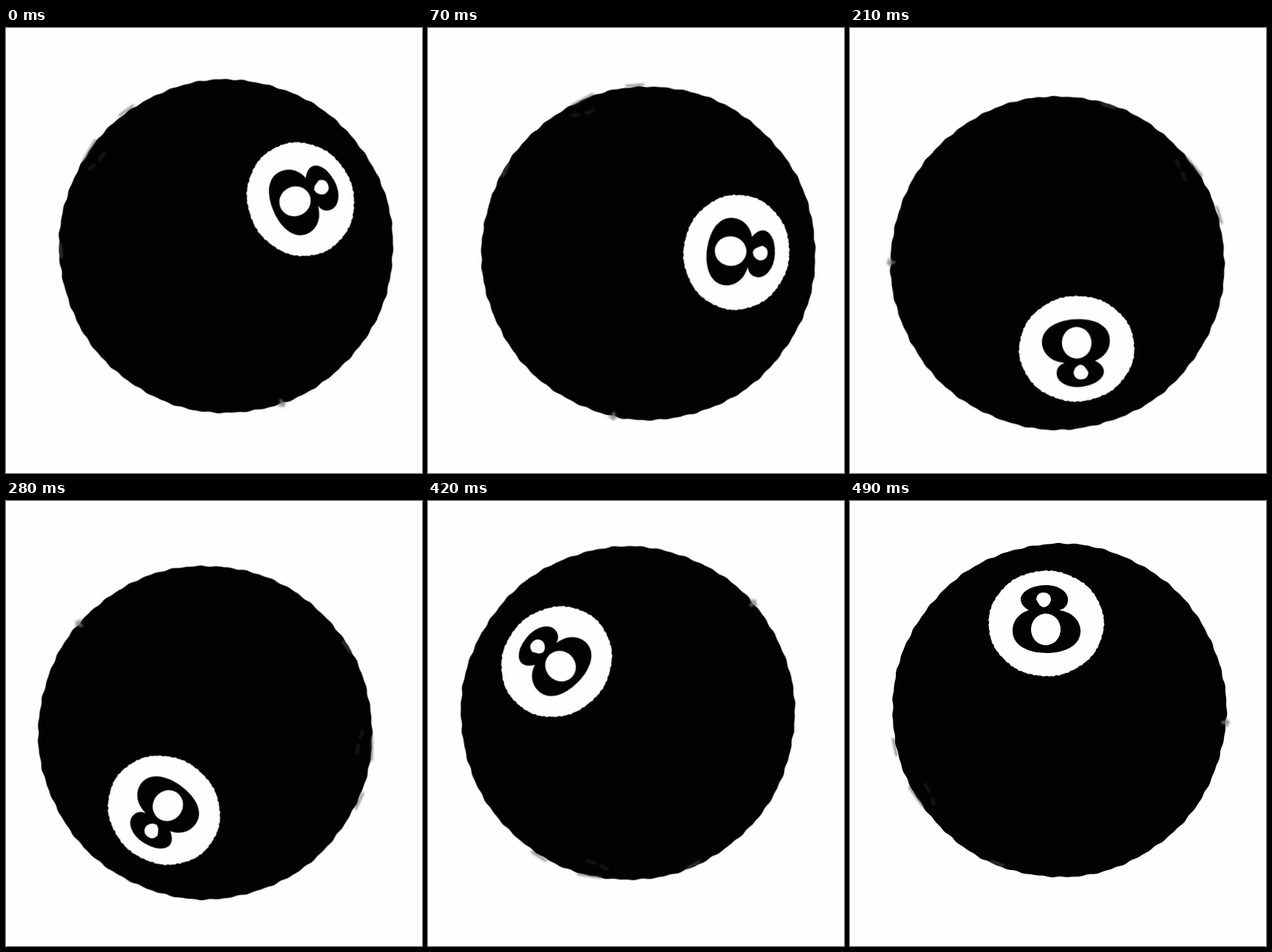
These frames come from a looping animation (563 px wide and 603 px high, 0.56 s). An HTML page:

```html
<!DOCTYPE html>
<html lang="en">
<head>
<meta charset="utf-8">
<title>Rolling eight ball</title>
<style>
  html, body { margin: 0; width: 100%; height: 100%; overflow: hidden; background: #fefefe; }
  svg { display: block; width: 563px; height: 603px; }
</style>
</head>
<body>
<svg viewBox="0 0 563 603">
  <defs>
    <filter id="soft" x="-5%" y="-5%" width="110%" height="110%"><feGaussianBlur stdDeviation=".6"/></filter>
    <filter id="smudge" x="-50%" y="-50%" width="200%" height="200%"><feGaussianBlur stdDeviation="1.5"/></filter>
  </defs>
  <g id="roll">
    <g filter="url(#soft)">
      <path id="ball" fill="#020202"/>
      <path id="disc" fill="#fefefe"/>
      <path fill="#020202" d="M263 114 C280 113 295 122 295 133 C295 141 291 146 283 148
        C300 150 312 162 312 176 C312 196 291 206 266 206 C240 206 220 195 220 176
        C220 162 229 152 242 148 C235 144 231 139 231 133 C232 122 246 115 263 114Z"/>
      <ellipse cx="265" cy="174" rx="20" ry="21.5" fill="#fefefe"/>
      <path fill="#fefefe" d="M262 124 C268 124 272 128 272 134 C271 139 268 143 262 144
        C257 143 255 139 252 133 C253 127 256 124 262 124Z"/>
    </g>
    <g filter="url(#smudge)" fill="none" stroke-linecap="round">
      <path d="M504 300 H513 M510 296 V305" stroke="#888" stroke-width="3"/>
      <path d="M58 322 L63 345 M80 388 L99 414 M190 488 L208 494" stroke="#555" stroke-width="2"/>
      <path d="M102 384 L107 394 M111 403 L113 411" stroke="#181818" stroke-width="4"/>
    </g>
  </g>
</svg>
<script>
const STEP_MS = 70;
const ANGLES = [66.3, 98, 131.6, 176, 216.6, 278.2, 314.5, 0];
const roll = document.getElementById('roll');

// Closed ellipse whose edge wavers by about `rough` pixels
function roughEllipse(cx, cy, rx, ry, rough) {
  const count = 360;
  const points = Array.from({ length: count }, (_, i) => {
    const a = i / count * 2 * Math.PI;
    const d = rough * (Math.sin(71 * a) + Math.sin(43 * a + 1) + Math.sin(9 * a + 2)) / 2;
    return `${(cx + (rx + d) * Math.cos(a)).toFixed(2)} ${(cy + (ry + d) * Math.sin(a)).toFixed(2)}`;
  });
  return `M${points.join('L')}Z`;
}

document.getElementById('ball').setAttribute('d', roughEllipse(283.3, 283.7, 226, 226, 0.9));
document.getElementById('disc').setAttribute('d', roughEllipse(265.5, 166, 78, 71.5, 0.6));

function draw() {
  const step = Math.floor(performance.now() / STEP_MS) % ANGLES.length;
  roll.setAttribute('transform', `rotate(${ANGLES[step]} 281.5 301)`);
  requestAnimationFrame(draw);
}
draw();
</script>
</body>
</html>
```
